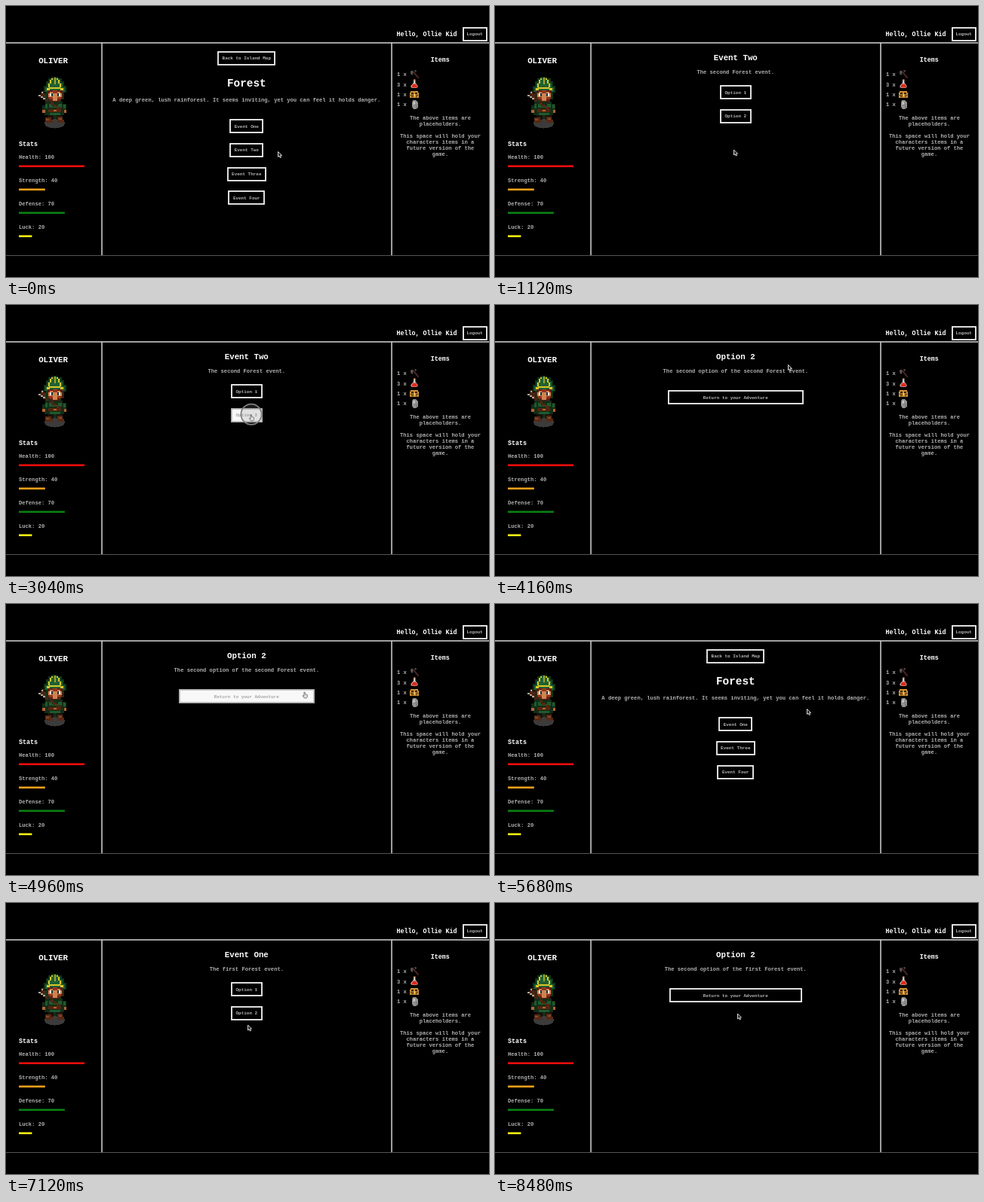
Write an HTML page that moves like this. It is 640 px wide and 360 px high and loops after 8.56 s.

```html
<!DOCTYPE html>
<html lang="en">
<head>
<meta charset="utf-8">
<title>Island adventure</title>
<style>
  html, body { margin: 0; width: 100%; height: 100%; overflow: hidden; background: #000; }
  svg { display: block; width: 640px; height: 360px; }
  text { font-family: "Liberation Mono", "Courier New", monospace; font-weight: 700; white-space: pre; }
  .pix { shape-rendering: crispEdges; }
  .btn rect { fill: #000; stroke: #f4f4f4; stroke-width: 1.8; }
  .btn text { fill: #b6b6b6; }
  .btn.hot rect { fill: #f8f8f8; stroke: #bdbdbd; }
  .btn.hot text { fill: #a4a4a4; }
</style>
</head>
<body>
<svg id="stage" viewBox="0 0 640 360" xmlns="http://www.w3.org/2000/svg"></svg>
<script>
const LOOP = 8560, STEP = 80, MID = 318.8;
const BODY = 7.13, SMALL = 5.97, HEAD = 10.75, SIDE = 8.36;
const WHITE = '#fff', GREY = '#b0b0b0';

// y is the middle of the capitals
const text = (x, y, size, str, fill = GREY, anchor = 'middle') =>
  `<text x="${x}" y="${y + size * 0.32}" font-size="${size}" fill="${fill}" text-anchor="${anchor}">${str}</text>`;
const left = (x, y, size, str, fill) => text(x, y, size, str, fill, 'start');
const rect = (x, y, w, h, fill) =>
  `<rect x="${x}" y="${y}" width="${w}" height="${h}" fill="${fill}"/>`;
const shape = (fill, d) => `<path fill="${fill}" d="${d}"/>`;

function button(cx, cy, w, str) {
  const x = Math.round(cx - w / 2), y = Math.round(cy - 9.5);
  return `<g class="btn" data-box="${x},${y},${w},19">` +
    `<rect x="${x + 1}" y="${y + 1}" width="${w - 2}" height="17"/>` +
    text(cx, cy, SMALL, str, '') + '</g>';
}

function frame() {
  const edge = '#d4d4d4';
  return rect(0, 48.2, 640, 1.5, edge) + rect(126.3, 49, 1.5, 282, edge) +
    rect(510.3, 49, 1.5, 282, edge) + rect(0, 331, 640, 1, '#545454') +
    left(517.5, 37.5, SIDE, 'Hello, Ollie Kid', WHITE) +
    button(621.2, 37.3, 33, 'Logout');
}

function hero() {
  return '<g class="pix">' +
    '<ellipse cx="64.5" cy="155.5" rx="13.5" ry="7" fill="#3b3b3b"/>' +
    // bow and quiver
    shape('#4a2512', 'M47 113h3v3h3v5h3v9h-4v-5h-3v-4h-3z') +
    shape('#b0a898', 'M43 118h3v2h3v2h3v2h-3v-2h-3v-2h-3zM47 114h2v2h-2z') +
    // hood
    shape('#10331a', 'M60 94h9v2h5v4h3v6h3v9h-3v9h-4v4h-17v-4h-3v-9h-3v-9h3v-6h3v-4h4z') +
    shape('#1f6133', 'M61 96h7v2h4v4h3v6h3v6h-26v-6h3v-6h3v-4h3z') +
    shape('#d8c72a', 'M60 96h2v2h-2v5h-2v5h-2v-5h2v-5h2zM67 96h2v2h2v5h2v5h-2v-5h-2v-5h-2zM54 109h3v-1h15v1h4v3h-4v-2h-14v2h-4z') +
    shape('#a5a42a', 'M64 95h2v9h-2z') +
    // face
    shape('#5c2013', 'M55 112h20v12h-3v4h-14v-4h-3z') +
    shape('#cf8450', 'M58 114h14v2h2v5h-2v3h-4v2h-6v-2h-4v-3h-2v-5h2z') +
    shape('#91341d', 'M62 112h6v4h-6zM57 121h5v3h-5zM68 121h5v3h-5z') +
    shape('#e9e8de', 'M58 116h4v4h-4zM68 116h4v4h-4z') +
    shape('#17353c', 'M60 116h2v4h-2zM68 116h2v4h-2z') +
    // tunic, arms and belt
    shape('#142c18', 'M55 127h20v3h5v10h-3v5h-3v5h-19v-5h-4v-4h-3v-9h4v-5h3z') +
    shape('#1f5a2d', 'M57 130h4v3h8v-3h5v5h-17zM52 130h3v6h-3zM76 131h3v5h-3zM58 142h14v3h-14z') +
    shape('#54260f', 'M59 128h4v3h4v3h5v3h-5v-3h-5v-3h-3zM56 137h17v4h-17z') +
    shape('#b06534', 'M48 138h4v4h-4zM77 138h3v4h-3zM63 138h4v2h-4z') +
    // legs and boots
    shape('#1a110d', 'M55 145h8v6h-8zM67 145h8v6h-8z') +
    shape('#552a16', 'M52 148h8v3h2v4h-10zM68 147h7v4h2v4h-9z') +
    shape('#864a27', 'M53 150h4v2h-4zM70 149h4v2h-4z') +
    '</g>';
}

function stats() {
  const rows = [['Health', 100, '#f00d0d'], ['Strength', 40, '#f5a01a'],
                ['Defense', 70, '#0a8212'], ['Luck', 20, '#fbf313']];
  return text(62.5, 73, HEAD, 'OLIVER', WHITE) + hero() +
    left(17, 183.3, SIDE, 'Stats', WHITE) +
    rows.map(([name, value, color], i) => {
      const y = 200.6 + i * 31;
      return left(17, y, BODY, `${name}: ${value}`) +
        rect(17, y + 10.9, value * 0.87, 2.6, color);
    }).join('');
}

function items() {
  const notes = [[149, 'The above items are'], [157, 'placeholders.'],
                 [173, 'This space will hold your'], [181, 'characters items in a'],
                 [189, 'future version of the'], [197, 'game.']];
  const icons =
    // axe
    shape('#4a2424', 'M538.5 86h1.5l7 8.5v1.5h-1.5l-7-8.5z') +
    shape('#5d5757', 'M536 87l2-1.5 1.5 2.5-1 4-2-1.5zM541 85l3 .5-1 3z') +
    // potion
    shape('#cfc6c2', 'M540 98h2.5v4l3 4v2l-2 1h-5l-2-1v-2l3.5-4z') +
    shape('#e02a1a', 'M539.5 103.5h3.5l2 3-.5 2h-6.500l-.5-2z') +
    shape('#8f532b', 'M540 97h2.500v1.500h-2.500z') +
    // chest
    shape('#cf9234', 'M536 113h10v2h1v7h-12v-7h1z') +
    shape('#35200c', 'M537 115h3v2h-3zM542 115h3v2h-3zM536 118h4v1h-4zM543 118h3v1h-3zM537 120h3v1h-3zM543 120h2v1h-2z') +
    shape('#f6d878', 'M541 117h1v3h-1z') +
    // helmet
    shape('#929292', 'M538.500 126l1.500-1h3l3 3v7l-3 2h-3l-2-3v-4z') +
    shape('#c3c3c3', 'M539.500 127h2.500v4h-2.500z') +
    shape('#757575', 'M541 131h4v1h-4zM543 133h2v2h-2z');
  return text(575.3, 71, SIDE, 'Items', WHITE) +
    [1, 3, 1, 1].map((n, i) => left(518, 91 + i * 13.4, BODY, `${n} x`)).join('') +
    icons + notes.map(([y, str]) => text(575.5, y, BODY, str)).join('');
}

function forest(...events) {
  const widths = { One: 45, Two: 45, Three: 52, Four: 49 };
  return button(MID, 69.3, 77, 'Back to Island Map') +
    text(MID, 102.8, 14.4, 'Forest', WHITE) +
    text(MID, 125, BODY, 'A deep green, lush rainforest. It seems inviting, yet you can feel it holds danger.') +
    events.map((n, i) => button(MID, 159.8 + i * 31.7, widths[n], `Event ${n}`)).join('');
}
const page = (title, line) =>
  text(MID, 68.7, HEAD, title, WHITE) + text(MID, 87.6, BODY, line);
const event = (n, nth) =>
  page(`Event ${n}`, `The ${nth} Forest event.`) +
  button(MID, 114.6, 42, 'Option 1') + button(MID, 146.3, 42, 'Option 2');
const outcome = (nth, w) =>
  page('Option 2', `The second option of the ${nth} Forest event.`) +
  button(MID, 122.9, w, 'Return to your Adventure');

const scenes = [
  [0, forest('One', 'Two', 'Three', 'Four')],
  [800, event('Two', 'second')],
  [3200, outcome('second', 180)],
  [5360, forest('One', 'Three', 'Four')],
  [7040, event('One', 'first')],
  [8320, outcome('first', 176)]
];
const clicks = [640, 2960, 5200, 6880, 8160];

// time, x and y of the pointer tip
const route = [
  [0, 360, 193], [480, 324, 191], [800, 319, 190], [1120, 316, 190.5],
  [1760, 315, 197], [2320, 319, 172], [2720, 325, 146], [3200, 325, 146],
  [3360, 330, 142], [4160, 388, 79], [4640, 395, 98], [5120, 396, 124],
  [5360, 398, 127], [5680, 413, 139], [6240, 370, 162], [6720, 323, 161],
  [7120, 320, 161.5], [7600, 324, 168], [8000, 321, 147], [8480, 321, 146.5], [LOOP, 321, 146.5]
];

const stage = document.getElementById('stage');
stage.innerHTML = rect(0, 0, 640, 360, '#000') + frame() + stats() + items() +
  scenes.map(s => `<g class="scene">${s[1]}</g>`).join('') +
  '<circle id="ring" fill="#888" fill-opacity=".2" stroke="#808080" stroke-width="1.8"/>' +
  '<g id="pointer" stroke-linejoin="round">' +
  '<path id="arrow" fill="#222" stroke="#d4d4d4" stroke-width="1" d="M.5 .5v7l1.6-1.4 1.2 2.5 1.3-.6-1.2-2.4h2.1z"/>' +
  '<path id="hand" fill="#e2e2e2" stroke="#666" stroke-width=".8" d="M-.8 0h1.3v2.5l3 .8v2.8l-1 1.6h-3l-2.2-3 .6-.7 1.3 1z"/></g>';

const find = id => document.getElementById(id);
const ring = find('ring'), pointer = find('pointer'), arrow = find('arrow'), hand = find('hand');
const groups = [...document.querySelectorAll('.scene')].map(el => ({
  el,
  buttons: [...el.querySelectorAll('.btn')].map(b => ({ b, box: b.dataset.box.split(',').map(Number) }))
}));
const show = (el, on) => el.setAttribute('display', on ? 'inline' : 'none');

function pointerAt(t) {
  const i = route.findIndex(k => k[0] > t);
  const [t0, x0, y0] = route[i - 1], [t1, x1, y1] = route[i];
  const u = (t - t0) / (t1 - t0), e = u * u * (3 - 2 * u);
  return [x0 + (x1 - x0) * e, y0 + (y1 - y0) * e];
}

function draw(now) {
  const t = Math.floor((now % LOOP) / STEP) * STEP;
  const [x, y] = pointerAt(t);
  const current = scenes.filter(s => s[0] <= t).length - 1;
  let over = false;
  groups.forEach(({ el, buttons }, i) => {
    show(el, i === current);
    if (i !== current) return;
    for (const { b, box: [bx, by, w, h] } of buttons) {
      const hot = x >= bx && x <= bx + w && y >= by && y <= by + h;
      b.classList.toggle('hot', hot);
      over = over || hot;
    }
  });
  show(arrow, !over);
  show(hand, over);
  pointer.setAttribute('transform', `translate(${x} ${y})`);

  const age = t - clicks.filter(c => c <= t).pop();
  const active = age >= 0 && age < 240;
  show(ring, active);
  if (active) {
    ring.setAttribute('cx', x);
    ring.setAttribute('cy', y - 0.8);
    ring.setAttribute('r', 11.6 + age / 40);
    ring.setAttribute('opacity', age > 80 ? 0.6 : 1);
  }
}

function tick() {
  draw(performance.now());
  requestAnimationFrame(tick);
}
tick();
</script>
</body>
</html>
```
